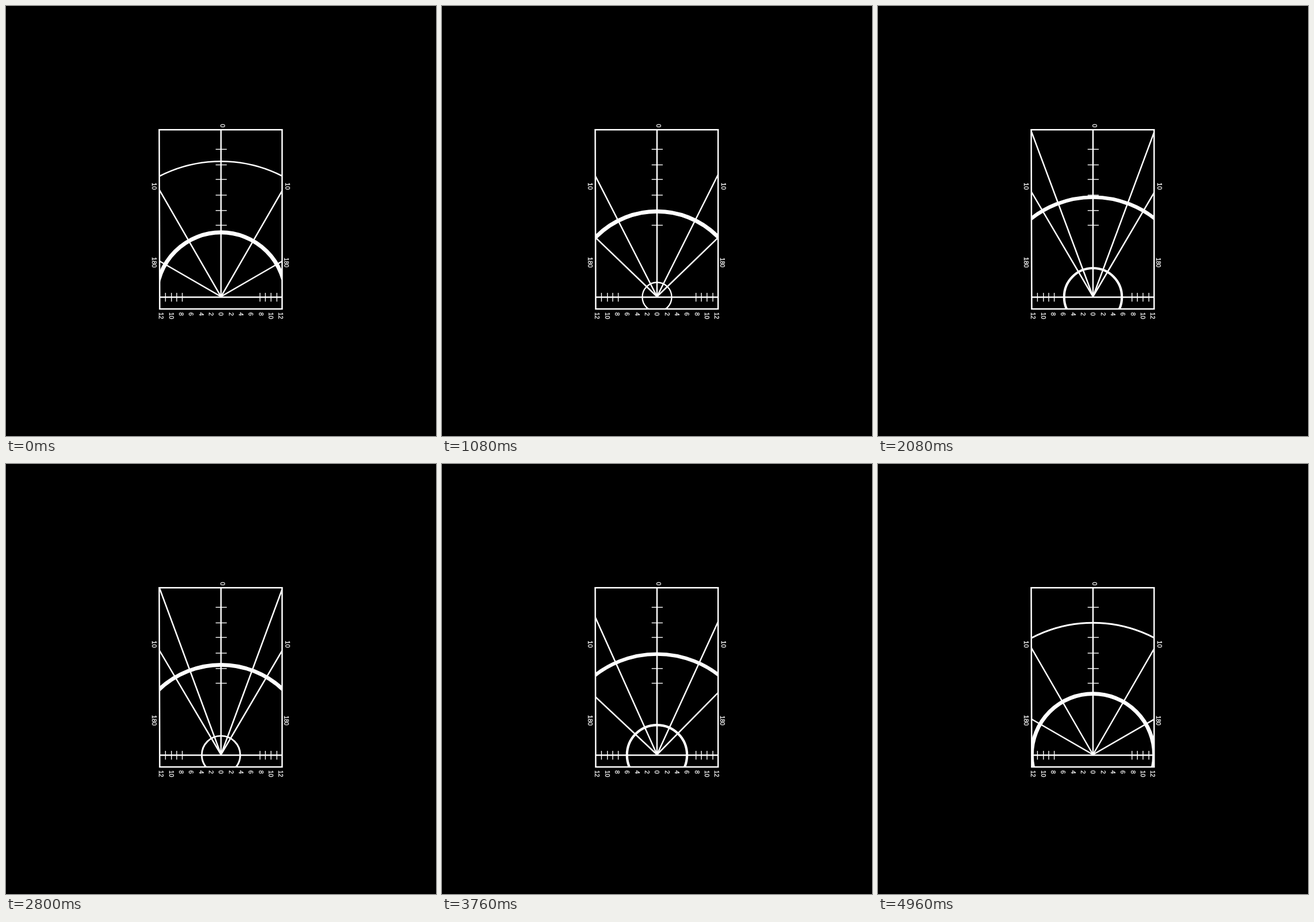
An HTML page with a canvas that plays this animation: 748 px wide and 748 px high, repeating every 5000 ms.

```html
<!DOCTYPE html>
<html lang="en">
<head>
<meta charset="utf-8">
<title>Radar scale</title>
<style>
html, body { margin: 0; width: 100%; height: 100%; overflow: hidden; background: #000; }
canvas { display: block; }
</style>
</head>
<body>
<canvas id="stage" width="748" height="748"></canvas>
<script>
const ctx = document.getElementById('stage').getContext('2d');
const LOOP = 5000, HALF = LOOP / 2, STEP = 40;
const CX = 374, CY = 506.3;
const RING_GAP = 123.5, RING_START = 112.5, RING_MAX = 265;
const RINGS_PER_LOOP = 6;

// Angles are measured from vertical; leads are in ms.
const rays = [
  { side: -1, from: 30, to: 20.25, leadOut: -26, leadBack: -95 },
  { side: 1, from: 30, to: 20.25, leadOut: 30, leadBack: -48 },
  { side: -1, from: 60, to: 30.3, leadOut: 142, leadBack: 40 },
  { side: 1, from: 60, to: 30.3, leadOut: 145, leadBack: -26 }
];

const clamp = x => Math.min(1, Math.max(0, x));
const ease = x => x < 0.5 ? 4 * x ** 3 : 1 - 4 * (1 - x) ** 3;

function line(x1, y1, x2, y2, width) {
  ctx.lineWidth = width;
  ctx.beginPath();
  ctx.moveTo(x1, y1);
  ctx.lineTo(x2, y2);
  ctx.stroke();
}

function framePath() {
  ctx.beginPath();
  ctx.moveTo(266.5, 215.2);
  ctx.lineTo(480.3, 215.2);
  ctx.lineTo(480.3, 527);
  ctx.lineTo(267.4, 527);
  ctx.closePath();
}

// Vertical label reading downwards from (x, y), centred on x.
function label(text, x, y, size) {
  ctx.save();
  ctx.translate(x - size * 0.35, y);
  ctx.rotate(Math.PI / 2);
  ctx.font = size + 'px "Liberation Sans", Arial, sans-serif';
  ctx.lineWidth = 0.3;
  ctx.fillText(text, 0, 0);
  ctx.strokeText(text, 0, 0);
  ctx.restore();
}

function drawRings(t) {
  const phase = (RING_START + t / LOOP * RINGS_PER_LOOP * RING_GAP) % RING_GAP;
  for (let r = phase; r < RING_MAX; r += RING_GAP) {
    ctx.lineWidth = 0.3 + 6.8 * Math.sin(Math.PI * r / RING_MAX);
    ctx.beginPath();
    ctx.arc(CX, CY, r, 0, Math.PI * 2);
    ctx.stroke();
  }
}

function drawRays(t) {
  for (const { side, from, to, leadOut, leadBack } of rays) {
    const p = t < HALF
      ? ease(clamp((t + leadOut) / HALF))
      : 1 - ease(clamp((t - HALF + leadBack) / HALF));
    const a = (from + (to - from) * p) * Math.PI / 180;
    line(CX, 505.5, CX + side * 400 * Math.sin(a), 505.5 - 400 * Math.cos(a), 2.5);
  }
}

function drawScale() {
  framePath();
  ctx.lineWidth = 2.5;
  ctx.stroke();
  line(CX, 215, CX, 506.5, 2.5);
  line(267, 506.5, 480, 506.5, 2.5);
  for (const y of [249.3, 276.4, 301.6, 329, 355.8, 381.4]) line(364.7, y, 384, y, 1.4);
  for (const x of [277.4, 287.8, 297, 306.6, 441.8, 451.2, 461, 471.2]) line(x, 499, x, 514.3, 1.4);

  label('0', 376.6, 205.2, 11);
  label('10', 257.5, 307.3, 11);
  label('10', 489.8, 307.3, 11);
  label('180', 257.5, 436.8, 11);
  label('180', 487.8, 438, 10);
  for (let i = -6; i <= 6; i++) label(String(Math.abs(i * 2)), CX + i * 17.33, 533, 10.5);
}

function draw(now) {
  const t = Math.floor(now % LOOP / STEP) * STEP;
  ctx.fillStyle = '#000';
  ctx.fillRect(0, 0, 748, 748);
  ctx.fillStyle = ctx.strokeStyle = '#fff';
  ctx.save();
  framePath();
  ctx.clip();
  drawRings(t);
  drawRays(t);
  ctx.restore();
  drawScale();
}

const start = performance.now();
function tick() {
  draw(performance.now() - start);
  requestAnimationFrame(tick);
}
tick();
</script>
</body>
</html>
```
